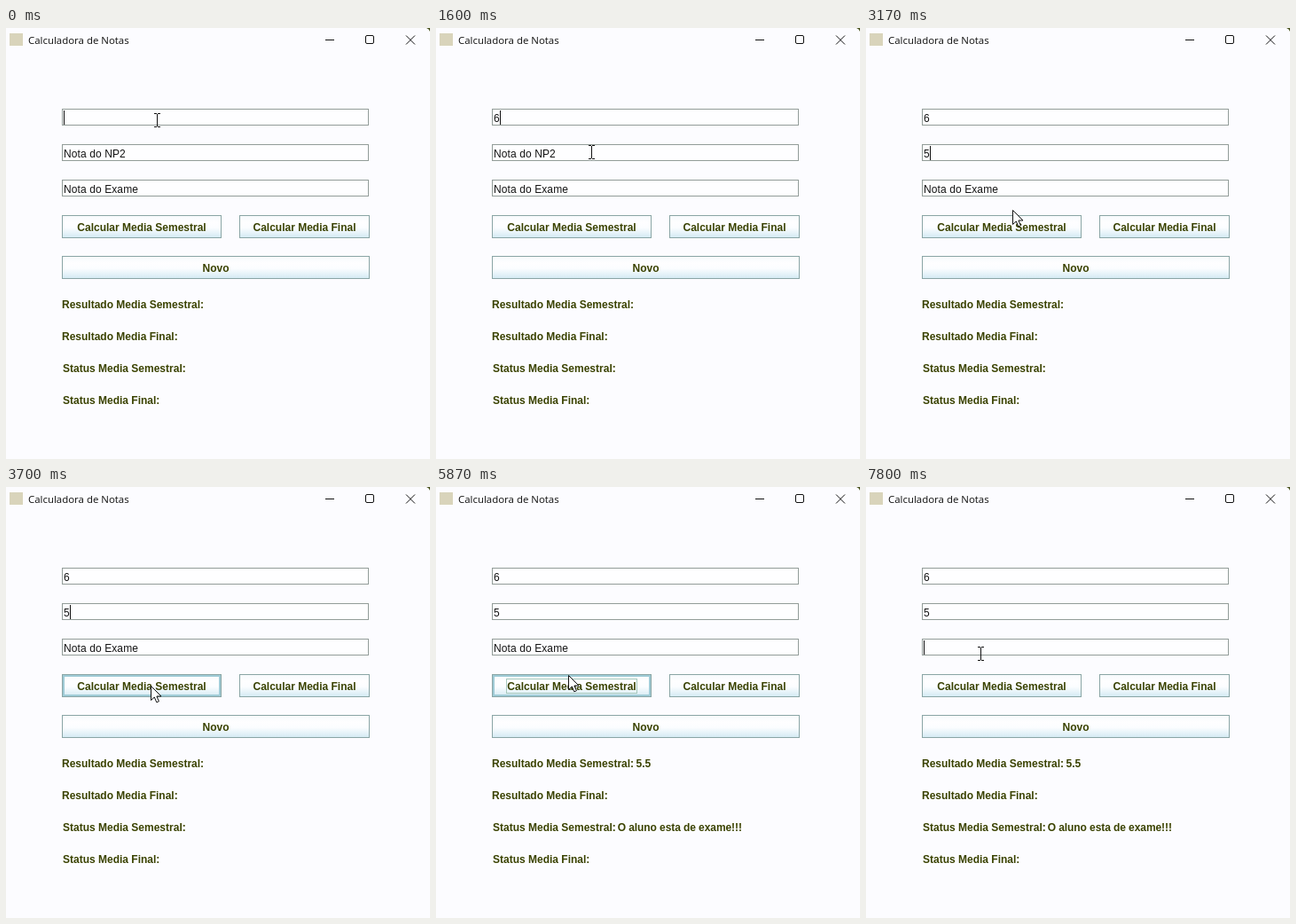
Recreate the animation shown at these times as an HTML page. Size 478 px wide and 486 px high, loop 8 s.

```html
<!DOCTYPE html>
<html lang="pt">
<head>
<meta charset="utf-8">
<title>Calculadora de Notas</title>
<style>
  html, body { margin: 0; width: 100%; height: 100%; overflow: hidden; background: #fcfcff; }
  svg { display: block; width: 478px; height: 486px; }
  text { font: 12px "Liberation Sans", Arial, sans-serif; fill: #141414; white-space: pre; }
  .title { font: 11.45px "Open Sans", "Noto Sans", sans-serif; fill: #111; }
  .bold text, text.bold { font-weight: bold; fill: #3a4200; }
  .mid { text-anchor: middle; }
  .field text { letter-spacing: .1px; }
  .line { fill: none; stroke: #111; }
  .crisp { shape-rendering: crispEdges; }
</style>
</head>
<body>
<svg viewBox="0 0 478 486">
  <defs>
    <linearGradient id="face" x1="0" y1="0" x2="0" y2="1">
      <stop offset="0" stop-color="#f6fafc"/>
      <stop offset=".3" stop-color="#fefeff"/>
      <stop offset=".55" stop-color="#fbfdff"/>
      <stop offset="1" stop-color="#d3eaf3"/>
    </linearGradient>
  </defs>
  <rect width="478" height="486" fill="#fcfcff"/>
  <path d="M474 0H478V4Q477 1 474 0" fill="#4a5420"/>

  <!-- title bar -->
  <rect x="4" y="6" width="15" height="14" fill="#d9d4bb"/>
  <text class="title" x="25" y="18">Calculadora de Notas</text>
  <path class="line crisp" d="M360 13.5H370"/>
  <rect class="line" x="405.5" y="8.5" width="9" height="9" rx="1.5"/>
  <path class="line" d="M451 8.5L461 18.5M461 8.5L451 18.5"/>

  <g id="fields" class="field"></g>
  <g id="buttons" class="bold"></g>
  <g class="crisp" fill="none">
    <rect id="hover" x="65" y="213" width="176" height="22" stroke="#9fcbd6" stroke-width="2"/>
    <rect id="ring" x="79.5" y="216.5" width="147" height="16" stroke="#a6c8bc"/>
  </g>

  <g class="bold">
    <text x="63" y="316">Resultado Media Semestral:</text>
    <text x="63" y="352">Resultado Media Final:</text>
    <text x="64" y="388">Status Media Semestral:</text>
    <text x="64" y="424">Status Media Final:</text>
    <g id="result">
      <text x="225.5" y="316">5.5</text>
      <text x="204.7" y="388" letter-spacing="-.08">O aluno esta de exame!!!</text>
    </g>
  </g>

  <rect id="caret" class="crisp" width="1" height="16" fill="#111"/>
  <path id="beam" class="line crisp" d="M-3 -7.5H0M1 -7.5H4M.5 -7V7M-3 7.5H0M1 7.5H4"/>
  <path id="arrow" d="M.5 .5V16.5L4.3 13L6.8 18.8L9.4 17.7L6.9 12H12Z" fill="#fff" stroke="#111"/>
</svg>
<script>
const LOOP = 8000;
const $ = id => document.getElementById(id);

const field = y => `
  <rect class="crisp" x="63.5" y="${y + .5}" width="345" height="18" fill="#fefeff" stroke="#929c98"/>
  <text id="note${y}" x="65" y="${y + 15}"></text>`;

const button = (x, y, w, label) => `
  <rect class="crisp" x="${x + .5}" y="${y + .5}" width="${w - 1}" height="25" fill="url(#face)" stroke="#8aa5a5"/>
  <text class="mid" x="${x + w / 2}" y="${y + 18}">${label}</text>`;

$('fields').innerHTML = [91, 131, 171].map(field).join('');
$('buttons').innerHTML =
  button(63, 211, 180, 'Calcular Media Semestral') +
  button(263, 211, 147, 'Calcular Media Final') +
  button(63, 257, 347, 'Novo');

// Each track lists [start ms, value...]; a value holds until the next entry.
const texts = {
  note91: [[0, ''], [1600, '6']],
  note131: [[0, 'Nota do NP2'], [2400, ''], [2830, '5']],
  note171: [[0, 'Nota do Exame'], [7000, '']]
};
const spans = { hover: [3300, 5930], ring: [3970, 7000], result: [4900, LOOP] };
const caret = [
  [0, 65, 93], [200], [1600, 72, 93], [2400, 65, 133], [2830, 72, 133],
  [3200], [3700, 72, 133], [3970], [7000, 65, 173], [7200], [7800, 65, 173]
];
const pointer = [
  [0, 'beam', 170, 104], [1600, 'beam', 175, 140], [1630, 'beam', 177, 177],
  [1930, 'beam', 174, 172], [2000, 'beam', 171, 167], [2270, 'beam', 162, 147],
  [2830, 'beam', 168, 165], [2930, 'beam', 174, 183],
  [3170, 'arrow', 165, 205], [3230, 'arrow', 164, 209], [3300, 'arrow', 163, 214],
  [3400, 'arrow', 163, 219], [3470, 'arrow', 163, 223], [3530, 'arrow', 163, 224],
  [5070, 'arrow', 158, 222], [5100, 'arrow', 155, 222],
  [5870, 'arrow', 149, 212], [5930, 'arrow', 140, 198], [6000, 'beam', 136, 183],
  [6600, 'arrow', 132, 194], [6970, 'beam', 131, 187], [7200, 'beam', 129, 188]
];

const at = (track, t) => track.findLast(step => step[0] <= t).slice(1);
const show = (el, on) => { el.style.visibility = on ? 'visible' : 'hidden'; };
const place = (el, x, y) => el.setAttribute('transform', `translate(${x} ${y})`);

function draw(t) {
  for (const id in texts) $(id).textContent = at(texts[id], t)[0];
  for (const id in spans) show($(id), t >= spans[id][0] && t < spans[id][1]);

  const [cx, cy] = at(caret, t);
  show($('caret'), cx !== undefined);
  if (cx !== undefined) place($('caret'), cx, cy);

  const [kind, x, y] = at(pointer, t);
  for (const id of ['beam', 'arrow']) show($(id), id === kind);
  place($(kind), x, y);
}

const start = performance.now();
function tick() {
  draw((performance.now() - start) % LOOP);
  requestAnimationFrame(tick);
}
tick();
</script>
</body>
</html>
```
